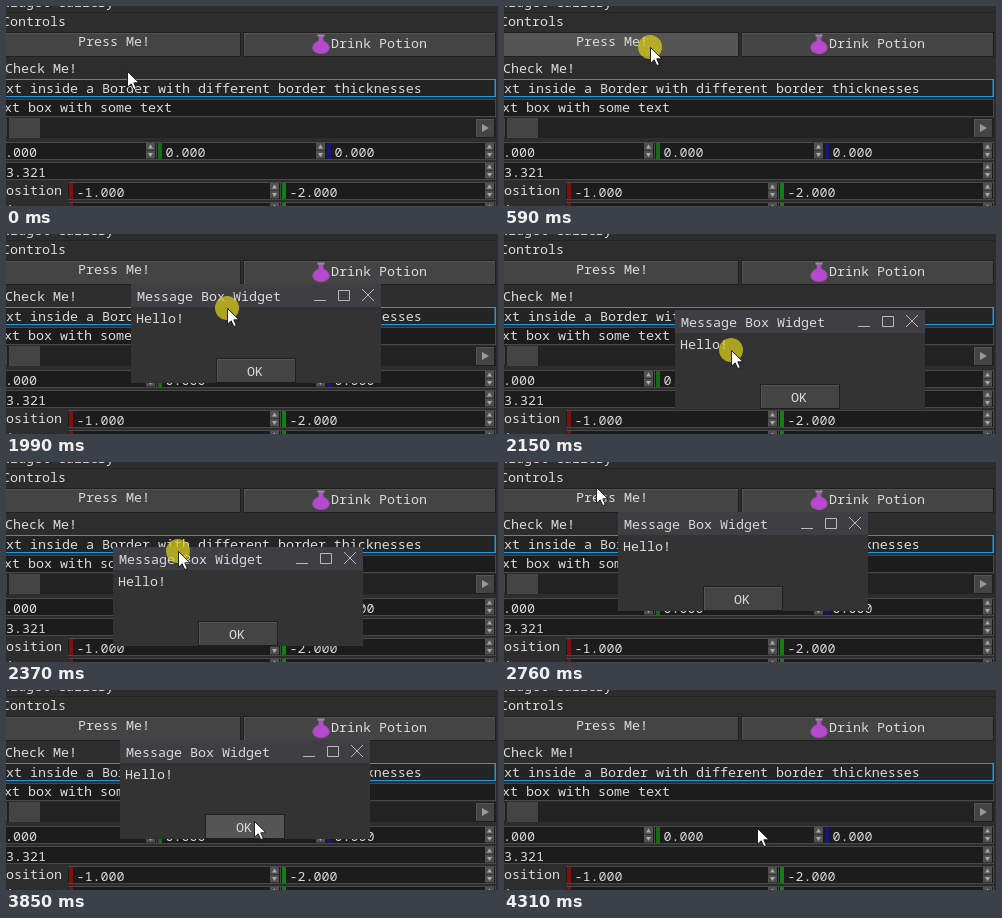
An HTML page for the animation above (4.69 s loop, 492 by 200 pixels).

```html
<!DOCTYPE html>
<html lang="en">
<head>
<meta charset="utf-8">
<title>Widget demo</title>
<style>
html, body { margin: 0; width: 100%; height: 100%; overflow: hidden; background: #2d2d2d; }
svg { display: block; width: 492px; height: 200px; }
text { font: 13.33px "Noto Sans Mono", "DejaVu Sans Mono", monospace; fill: #dadada; white-space: pre; }
</style>
</head>
<body>
<svg id="stage" viewBox="0 0 492 200">
  <g id="form"></g>
  <g id="dialog"></g>
  <circle id="press" r="12" fill="#d8c81c" fill-opacity=".75"/>
  <path id="cursor" d="M.5 .5V16.2L4.2 12.8L6.8 18.6L9.3 17.5L6.8 11.8H12Z" fill="#fff" stroke="#111" stroke-width=".9"/>
</svg>
<script>
const NS = "http://www.w3.org/2000/svg";
const $ = id => document.getElementById(id);
const form = $("form"), dialog = $("dialog"), press = $("press"), cursor = $("cursor");

function set(el, attrs) {
  for (const k in attrs) el.setAttribute(k, attrs[k]);
  return el;
}
const add = (parent, tag, attrs) => parent.appendChild(set(document.createElementNS(NS, tag), attrs));
const rect = (p, x, y, width, height, fill) => add(p, "rect", { x, y, width, height, fill });
const path = (p, d, stroke, fill = "none") => add(p, "path", { d, stroke, fill });
const label = (p, x, y, s) => { add(p, "text", { x, y }).textContent = s; };

// Returns the face, so that hovering can recolour it
function button(p, x, y, w, h) {
  rect(p, x, y, w, h, "#1f1f1f");
  rect(p, x + 1, y + 1, w - 2, h - 2, "#555");
  return rect(p, x + 2, y + 2, w - 3, h - 3, "#444");
}
function field(x, y, w, h = 18) {
  rect(form, x, y, w, h, "#484848");
  rect(form, x, y + 1, w - 1, h - 2, "#1c1c1c");
}
function spinner(x, y) {
  for (const dy of [0, 8]) rect(form, x, y + dy, 9, 7.5, "#505050");
  path(form, `M${x + 2} ${y + 5.5}l2.5-4l2.5 4ZM${x + 2} ${y + 10}l2.5 4l2.5-4Z`, "none", "#aaa");
}
function axis(x, y, end, color, value) {
  field(x, y, end - x);
  rect(form, x + 1, y + 1, 4, 16, color);
  label(form, x + 8.5, y + 14.5, value);
  spinner(end - 11, y + 1);
}

function buildForm() {
  rect(form, 0, 0, 492, 200, "#2d2d2d");
  rect(form, 0, 6, 492, 1, "#242424");
  label(form, -4, 1, "Widget Gallery");
  label(form, -4, 19.5, "Controls");
  const face = button(form, -3, 26, 238, 25);
  label(form, 72, 39.5, "Press Me!");
  button(form, 237, 26, 253, 25);
  label(form, 325, 41.5, "Drink Potion");
  path(form, "M313 30V35C304 38 305 47.500 315 47.500S326 38 317 35V30Z", "#8d5b9c", "#b848d0");
  rect(form, 311.5, 28.5, 7, 2, "#9c8aa3");

  label(form, -1, 66.5, "Check Me!");
  rect(form, -4, 73, 494, 18, "#1c9be0");
  rect(form, -4, 74, 492.5, 16, "#242424");
  label(form, 0, 87, "xt inside a Border with different border thicknesses");
  field(-2, 93, 492);
  label(form, -2, 106, "xt box with some text");

  rect(form, 0, 112, 490, 20, "#222");
  button(form, -20, 112, 22, 20);
  rect(form, 3, 112, 31, 20, "#444");
  button(form, 469, 112, 20, 20);
  path(form, "M476 118L483 122L476 126Z", "none", "#999");

  field(-2, 136, 153);
  label(form, -1, 150.5, ".000");
  spinner(140, 137);
  axis(151, 136, 321, "#176b17", "0.000");
  axis(320, 136, 490, "#15157c", "0.000");
  field(-2, 156, 492);
  label(form, 0, 170.5, "3.321");
  spinner(479, 157);

  [["osition", "-1.000", "-2.000"], ["ize", "3.000", "4.000"]].forEach(([name, a, b], i) => {
    const y = 176 + 20 * i;
    label(form, 0, y + 13, name);
    axis(62, y, 275, "#7d1010", a);
    axis(275, y, 490, "#128012", b);
  });
  return face;
}

function buildDialog() {
  rect(dialog, 0, 0, 250, 99, "#333");
  rect(dialog, 0, 0, 250, 23, "#3f3f43");
  label(dialog, 6, 17, "Message Box Widget");
  path(dialog, "M183 16.5H195M207.500 6.500H218.500V16.500H207.500ZM231 5L243 17M243 5L231 17", "#b8b8b8");
  label(dialog, 5, 39, "Hello!");
  const face = button(dialog, 85, 74, 80, 25);
  label(dialog, 116, 92, "OK");
  return face;
}

const LOOP = 4690, STEP = 230 / 3, LAG = 58;
const HOME = [114, 50], GRAB = [61, 26];
const OPEN = 690, GRABBED = 1917, DROPPED = 2530, CLOSED = 4310;
const CLICKS = [[590, OPEN], [1760, DROPPED], [2840, 2910], [3220, 3300], [4230, CLOSED]];

// Each move: begin, end, then evenly timed points; it starts where the last one stopped
const MOVES = [
  [130, 590, [146, 41]],
  [845, 1380, [205, 81], [271, 120], [240, 137]],
  [1380, 1763, [175, 76]],
  [GRABBED, 1993, [221, 74]],
  [1993, 2420, [230, 114], [171, 121], [175, 77]],
  [2453, 2760, [92, 25]],
  [2840, 3540, [260, 24], [423, 26], [240, 168], [155, 127]],
  [3540, 3850, [253, 131]],
  [3850, 4003, [253, 138]]
];

// Catmull-Rom curve through the points, k from 0 to 1
function curve(points, k) {
  const last = points.length - 1, i = Math.min(Math.floor(k * last), last - 1), u = k * last - i;
  const p = n => points[Math.max(0, Math.min(last, i + n))];
  if (last === 1) return [0, 1].map(c => p(0)[c] + (p(1)[c] - p(0)[c]) * u);
  return [0, 1].map(c => {
    const [a, b, d, e] = [-1, 0, 1, 2].map(n => p(n)[c]);
    return b + u / 2 * (d - a + u * (2 * a - 5 * b + 4 * d - e + u * (3 * (b - d) + e - a)));
  });
}

function pointer(t) {
  let from = [121, 65];
  for (const [begin, end, ...points] of MOVES) {
    if (t <= begin) break;
    if (t < end) return curve([from, ...points], (t - begin) / (end - begin));
    from = points[points.length - 1];
  }
  return from;
}

// The screen was sampled about 13 times a second
function sample(t) {
  if (t < 130) return 0;
  const base = t < OPEN ? 130 : OPEN;
  return base + Math.floor((t - base + 10) / STEP) * STEP;
}

const within = (v, a, b) => v >= a && v < b;
const show = (el, on) => set(el, { visibility: on ? "visible" : "hidden" });
const move = (el, [x, y]) => set(el, { transform: `translate(${Math.round(x)} ${Math.round(y)})` });

const pressFace = buildForm(), okFace = buildDialog();

function draw(ms) {
  const t = ms % LOOP, s = sample(t);
  const [x, y] = pointer(s), open = within(t, OPEN, CLOSED);
  const held = pointer(s - LAG);
  const dragged = within(s, GRABBED, DROPPED - 10);
  const [left, top] = dragged ? held.map((v, i) => v - GRAB[i]) : HOME;
  const overOk = within(x, left + 85, left + 165) && within(y, top + 74, top + 99);
  const overPress = t < OPEN && x < 235 && within(y, 26, 51);

  move(cursor, [x, y]);
  move(press, [x, y]);
  show(press, CLICKS.some(([a, b]) => within(t, a, b)));
  move(dialog, [left, top]);
  show(dialog, open);
  set(okFace, { fill: overOk ? "#555" : "#444" });
  set(pressFace, { fill: overPress ? "#555" : "#444" });
}

const start = performance.now();
function tick() {
  draw(performance.now() - start);
  requestAnimationFrame(tick);
}
tick();
</script>
</body>
</html>
```
